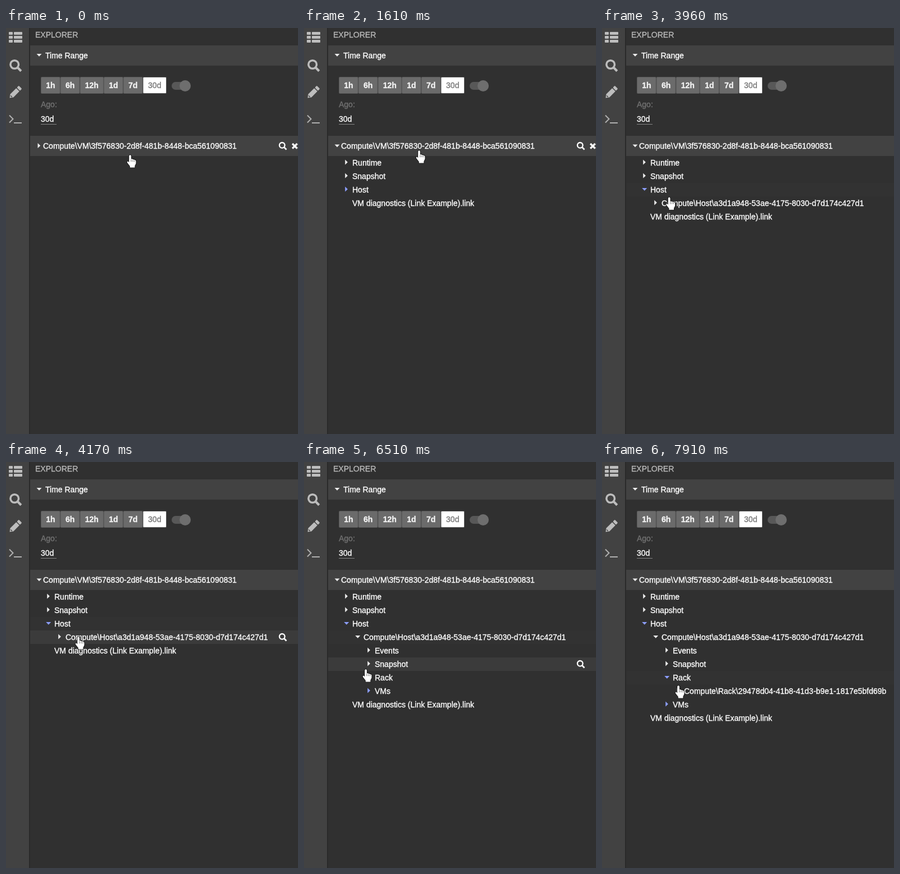
Animation of 520x723 px, one loop 8000 ms. Source, as an HTML page with a canvas:

```html
<!DOCTYPE html>
<html lang="en">
<head>
<meta charset="utf-8">
<title>Explorer</title>
<style>
html, body { margin: 0; height: 100%; overflow: hidden; background: #303030; }
canvas { display: block; }
</style>
</head>
<body>
<canvas id="stage" width="520" height="723"></canvas>
<script>
const ctx = document.getElementById('stage').getContext('2d');
const LOOP = 8000, TICK = 232.5, TICK_SHIFT = 25;
const TREE_TOP = 228, ROW = 24, HOTSPOT = 15;
const FONT = '14px "Liberation Sans", Arial, sans-serif';
const LINK = '#8c9eff', LIGHT = '#ececec', ICON = '#bdbdbd';
const HOVER = '#3b3b3b', PRESSED = '#474747', FOCUS = '#323232', RIPPLE = '#505050';

// A row shows once its parent is open; "opens" is its place in the order of clicks.
const ROWS = [
  { level: 0, label: 'Runtime', after: 1 },
  { level: 0, label: 'Snapshot', after: 1 },
  { level: 0, label: 'Host', after: 1, opens: 2, link: true },
  { level: 1, label: 'Compute\\Host\\a3d1a948-53ae-4175-8030-d7d174c427d1', after: 2, opens: 3 },
  { level: 2, label: 'Events', after: 3 },
  { level: 2, label: 'Snapshot', after: 3 },
  { level: 2, label: 'Rack', after: 3, opens: 4, link: true },
  { level: 3, label: 'Compute\\Rack\\29478d04-41b8-41d3-b9e1-1817e5bfd69b', after: 4 },
  { level: 2, label: 'VMs', after: 3, link: true },
  { level: 0, label: 'VM diagnostics (Link Example).link', after: 1, leaf: true }
];

// Clicks in ticks; links take one tick longer to open.
const CLICKS = [5, 14, 25, 32];

// Pointer moves: first tick, last tick, target position
const START = [223, 237];
const MOVES = [
  [2, 4, 207, 229], [8, 11, 103, 293], [15, 18, 131, 322],
  [19, 22, 101, 323], [26, 28, 112, 380], [28, 30, 117, 392], [32, 34, 138, 409]
];

const HAND = new Path2D('M4 2.5q1.8-3 3.6 0V8.5q1.6-1.4 3 .6q1.5-1 2.7.8q2-.6 2.5 1.6V16L13.8 20V23H5.5V20.5L.8 14.5q-.6-2.6 1.6-2.2L4 14z');
const KNUCKLES = new Path2D('M7.6 9V13M10.6 9.6V13M13.3 10.4V13');

function rect(x, y, w, h, color, radius = 0) {
  ctx.fillStyle = color;
  ctx.beginPath();
  ctx.roundRect(x, y, w, h, radius);
  ctx.fill();
}

function circle(x, y, r, color) {
  ctx.fillStyle = color;
  ctx.beginPath();
  ctx.arc(x, y, r, 0, 7);
  ctx.fill();
}

function text(label, x, y, color = '#fff', bold = false, align = 'left') {
  ctx.font = (bold ? 'bold ' : '') + FONT;
  ctx.textAlign = align;
  ctx.fillStyle = ctx.strokeStyle = color;
  ctx.lineWidth = 0.35;
  ctx.fillText(label, x, y + 5);
  ctx.strokeText(label, x, y + 5);
}

function trace(points) {
  ctx.beginPath();
  points.forEach(([x, y]) => ctx.lineTo(x, y));
}

function line(points, width, color) {
  trace(points);
  ctx.lineWidth = width;
  ctx.strokeStyle = color;
  ctx.stroke();
}

function polygon(points, color) {
  trace(points);
  ctx.fillStyle = color;
  ctx.fill();
}

function caret(x, y, open, color = LIGHT) {
  polygon(open
    ? [[x - 4.5, y - 2], [x + 4.5, y - 2], [x, y + 2.7]]
    : [[x - 2.5, y - 4.5], [x + 2.2, y], [x - 2.5, y + 4.5]], color);
}

function magnifier(x, y, r, width, color) {
  ctx.beginPath();
  ctx.arc(x, y, r, 0, 7);
  ctx.lineWidth = width;
  ctx.strokeStyle = color;
  ctx.stroke();
  const a = r * 0.8, b = r * 1.6;
  line([[x + a, y + a], [x + b, y + b]], width * 1.2, color);
}

function sidebar() {
  rect(0, 0, 42, 723, '#424242');
  rect(41, 0, 2, 723, '#2a2a2a');
  for (let y = 7; y < 24; y += 7) {
    rect(5, y, 7, 5, ICON, 1);
    rect(14, y, 15, 5, ICON, 1);
  }
  magnifier(15.2, 65, 7.3, 3.5, ICON);

  // Pencil, drawn lying along its own axis
  ctx.save();
  ctx.translate(6.5, 124.5);
  ctx.rotate(-Math.PI / 4);
  polygon([[0, 0], [5.5, -4], [20.5, -4], [20.5, 4], [5.5, 4]], ICON);
  rect(22, -4, 5, 8, ICON, 1.5);
  line([[4, -1.5], [4, 2]], 1.4, '#424242');
  ctx.restore();

  line([[6, 155.5], [12.5, 162], [6, 168.5]], 2, '#b0b0b0');
  rect(14, 168, 14, 2, '#b0b0b0');
}

function timeRange() {
  text('EXPLORER', 52, 12, '#b8b8b8');
  rect(43, 31, 477, 36, '#424242');
  caret(59, 48, true);
  text('Time Range', 70, 49);

  let x = 62;
  for (const label of ['1h', '6h', '12h', '1d', '7d', '30d']) {
    const active = label === '30d';
    ctx.font = 'bold ' + FONT;
    const w = ctx.measureText(label).width + 18.4;
    rect(x, 87, w, 30, '#5a5a5a', 2);
    rect(x + 1, 88, w - 2, 28, active ? '#fff' : '#6b6b6b', 1);
    text(label, x + w / 2, 102, active ? '#757575' : '#f2f2f2', !active, 'center');
    x += w;
  }
  rect(295, 96, 32, 14, '#585858', 7);
  circle(319, 103, 10, '#6e6e6e');

  text('Ago:', 62, 136, '#707070');
  text('30d', 62, 162);
  rect(62, 171, 28, 1, '#858585');
}

function header(open, hovered) {
  rect(43, 192, 477, 36, '#424242');
  caret(59, 209.5, open);
  text('Compute\\VM\\3f576830-2d8f-481b-8448-bca561090831', 66, 210);
  if (!hovered) return;
  magnifier(491.7, 208.8, 4.8, 2.3, '#fff');
  line([[510, 206], [518.5, 214.5]], 3.2, '#fff');
  line([[518.5, 206], [510, 214.5]], 3.2, '#fff');
}

function pressRow(x, y, link) {
  if (link) rect(43, y - 12, 477, ROW, PRESSED);
  ctx.save();
  ctx.beginPath();
  ctx.rect(43, y - 12, link ? 477 : 432, ROW);
  ctx.clip();
  circle(x, y + 2, link ? 56 : 500, RIPPLE);
  ctx.restore();
}

function tree(pointerX, pointerY, tick) {
  const clicks = CLICKS.filter(click => tick >= click).length;
  const isOpen = n => tick >= CLICKS[n - 1] + (n % 2 ? 0 : 1);
  const hoverIndex = Math.floor((pointerY - HOTSPOT - TREE_TOP) / ROW);
  const visible = ROWS.filter(row => isOpen(row.after));

  visible.forEach((row, i) => {
    const { level, label, opens, link, leaf } = row;
    const y = TREE_TOP + ROW * (i + 0.5), left = 86 + level * 20;
    const focused = opens && opens === clicks;
    const hovered = i === hoverIndex && level > 0 && !link;
    if (hovered || focused) rect(43, y - 12, 477, ROW, hovered ? HOVER : FOCUS);
    if (focused && tick === CLICKS[clicks - 1]) pressRow(pointerX, y, link);
    if (!leaf) caret(left - 10.3, y - 1, opens && isOpen(opens), link ? LINK : LIGHT);
    text(label, left, y);
    if (hovered) magnifier(491.7, y - 1.2, 4.8, 2.3, '#fff');
  });
}

function pointerAt(tick) {
  let [x, y] = START;
  for (const [from, to, endX, endY] of MOVES) {
    const p = Math.min(1, Math.max(0, (tick - from) / (to - from)));
    x += (endX - x) * p;
    y += (endY - y) * p;
  }
  return [x, y];
}

function pointer(x, y) {
  ctx.save();
  ctx.translate(x - 8, y - 12);
  ctx.scale(1.04, 1.02);
  ctx.lineWidth = 1.6;
  ctx.strokeStyle = '#111';
  ctx.stroke(HAND);
  ctx.fillStyle = '#fff';
  ctx.fill(HAND);
  ctx.lineWidth = 0.6;
  ctx.stroke(KNUCKLES);
  ctx.restore();
}

function draw(now) {
  const tick = Math.floor((now % LOOP + TICK_SHIFT) / TICK);
  const [x, y] = pointerAt(tick);
  rect(0, 0, 520, 723, '#303030');
  sidebar();
  timeRange();
  header(tick >= CLICKS[0], y - HOTSPOT < TREE_TOP);
  tree(x, y, tick);
  pointer(x, y);
  requestAnimationFrame(draw);
}
requestAnimationFrame(draw);
</script>
</body>
</html>
```
